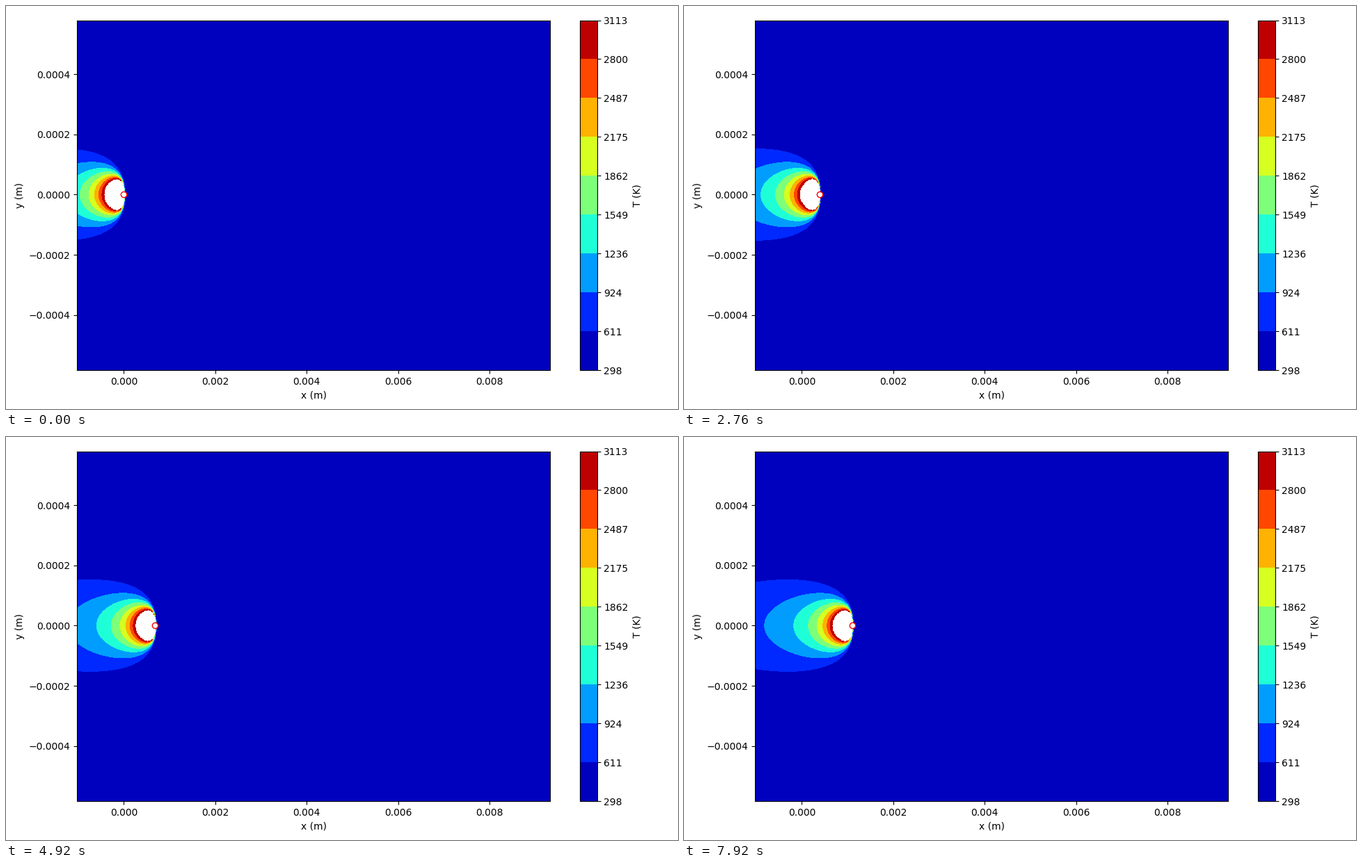
Recreate the animation shown at these times as a matplotlib script. Size 966 px wide and 580 px high, loop 8000 ms.

```python
import numpy as np
import matplotlib.pyplot as plt
from matplotlib.animation import FuncAnimation

W, H, DPI = 966, 580, 100
LOOP, TICK, HOLD = 8000, 40, 3      # loop and tick in ms, ticks per step

T0, T_MAX = 298, 3113
LEVELS = np.linspace(T0, T_MAX, 10)
STRENGTH = 1.2                      # K m, power / (2 pi k)
DECAY = 1.216e5                     # 1/m, speed / (2 diffusivity)
STEP = 16.67e-6                     # m travelled per step

X_MIN, X_MAX = -0.001027, 0.009325
Y_MIN, Y_MAX = -0.000583, 0.000579
X_NEAR = 0.0014                     # the heat never gets past this

plt.rcParams["font.family"] = "DejaVu Sans"
plt.rcParams["font.size"] = 10


def px_axes(left, top, right, bottom):
    return fig.add_axes([left / W, 1 - bottom / H, (right - left) / W, (bottom - top) / H])


def temperature(source):
    """Rosenthal field of a moving point source; boiling cells are left out."""
    xi = gx - source
    r = np.hypot(xi, gy) + 1e-9
    t = T0 + STRENGTH / r * np.exp(-DECAY * (r + xi))
    return np.ma.masked_greater(t, T_MAX)


fig = plt.figure(figsize=(W / DPI, H / DPI), dpi=DPI, facecolor="white")
ax = px_axes(102, 20.5, 782, 524)
cax = px_axes(824.5, 20.5, 849.7, 524)

xs = np.linspace(X_MIN, X_MAX, 500)
xs = xs[xs < X_NEAR]
ys = np.linspace(Y_MIN, Y_MAX, 280)
gx, gy = np.meshgrid(xs, ys)


def draw_field(source):
    return ax.contourf(gx, gy, temperature(source), levels=LEVELS, cmap="jet", zorder=1)


field = draw_field(0)
ax.axvspan(xs[-1], X_MAX, color=field.cmap(field.norm(LEVELS[:2].mean())),
           lw=0, antialiased=False, zorder=0.9)
spot, = ax.plot([0], [0], "o", ms=6, mfc="white", mec="red", mew=1, zorder=3)

ax.set(xlim=(X_MIN, X_MAX), ylim=(Y_MIN, Y_MAX), xlabel="x (m)", ylabel="y (m)")
ax.set_xticks(np.arange(0, 0.009, 0.002))
ax.set_yticks(np.linspace(-0.0004, 0.0004, 5))
ax.xaxis.set_major_formatter("{x:.3f}")
ax.yaxis.set_major_formatter(lambda v, _: f"{v:.4f}".replace("-", "\u2212"))

bar = fig.colorbar(field, cax=cax, ticks=LEVELS, format="%.0f")
bar.set_label("T (K)")

shown = 0


def update(i):
    global field, shown
    step = i // HOLD
    if step != shown:
        field.remove()
        field = draw_field(step * STEP)
        spot.set_data([step * STEP], [0])
        shown = step
    return [spot]


anim = FuncAnimation(fig, update, frames=LOOP // TICK, interval=TICK,
                     repeat=True, repeat_delay=0, blit=False)
plt.show()
```
